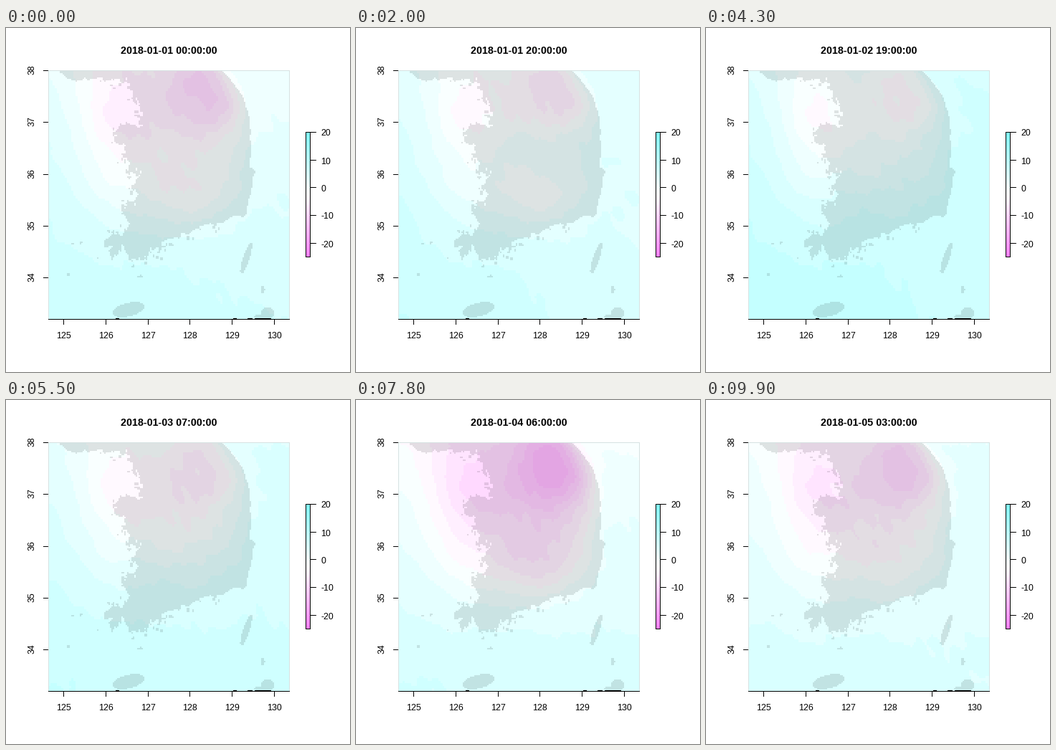
Recreate the animation shown at these times as a matplotlib script. Size 480 by 480 pixels, loop 10 s.

```python
import numpy as np
import matplotlib.pyplot as plt
from matplotlib.animation import FuncAnimation
from matplotlib.patches import Rectangle
from matplotlib.path import Path

FRAMES, INTERVAL = 100, 100
LEFT, RIGHT, TOP, BOTTOM = 59, 396, 59, 406
BANDS = 12          # colour steps on each side of white
rng = np.random.default_rng(18)

plt.rcParams["font.family"] = "Liberation Sans"
fig = plt.figure(figsize=(4.8, 4.8), dpi=100, facecolor="white")
ax = fig.add_axes([0, 0, 1, 1])
ax.axis("off")


def cell_centres(nx, ny):
    x = LEFT + (np.arange(nx) + 0.5) * (RIGHT - LEFT) / nx
    y = TOP + (np.arange(ny) + 0.5) * (BOTTOM - TOP) / ny
    return np.meshgrid(x, y)


def colours(level):
    """Magenta - white - cyan for levels in -1..1."""
    rgb = np.ones(level.shape + (3,))
    rgb[..., 0] -= 0.498 * np.clip(level, 0, 1)
    rgb[..., 1] -= 0.498 * np.clip(-level, 0, 1)
    return rgb


def show(img, box, z):
    x0, x1, y0, y1 = box
    return ax.imshow(img, extent=(x0, x1, y1, y0), interpolation="nearest",
                     aspect="auto", zorder=z)


# ---- temperature: a sea gradient between four corners, plus cold pools ----
gx, gy = cell_centres(115, 97)
u = (gx - LEFT) / (RIGHT - LEFT)
w = ((gy - TOP) / (BOTTOM - TOP)) ** 0.7


def pool(cx, cy, sx, sy):
    return np.exp(-((gx - cx) / sx) ** 2 - ((gy - cy) / sy) ** 2)


east_shore = 335 - 38 * np.exp(-(gy - TOP) / 35)
on_land = 1 / (1 + np.exp((gx - east_shore) / 9))
basis = np.array([
    (1 - u) * (1 - w), u * (1 - w), (1 - u) * w, u * w,
    pool(275, 85, 75, 65) * on_land,
    pool(255, 165, 85, 60) * on_land,
    pool(250, 235, 75, 45) * on_land,
    pool(150, 130, 55, 120),
])

# hour: corners NW, NE, SW, SE; pools north, centre, south, west
weather = {
    0: (1.8, 1.0, 4.9, 4.0, -4.8, -2.0, -2.5, -3.2),
    20: (2.4, 2.2, 5.0, 3.3, -4.0, -0.7, -2.6, -2.9),
    34: (1.8, 3.4, 6.0, 4.4, -6.1, -1.4, -4.7, -3.0),
    43: (2.8, 3.9, 5.9, 4.7, -3.6, -2.2, -0.6, -3.4),
    65: (1.5, 2.2, 4.3, 3.9, -2.6, -1.2, -0.2, -2.3),
    78: (0.0, 0.7, 4.1, 3.4, -7.1, -3.5, -3.1, -3.5),
    99: (0.8, 2.0, 3.6, 3.1, -4.8, -2.5, -1.7, -3.3),
}
hours = np.array(list(weather))
states = np.array(list(weather.values()))

inland = pool(250, 160, 75, 95)
relief = np.zeros_like(gx)
for _ in range(12):
    kx, ky = rng.normal(0, 0.09, 2)
    relief += 0.13 * np.sin(kx * gx + ky * gy + rng.uniform(0, 6.3))
relief *= 0.25 + inland


def daily(h):
    return np.cos(2 * np.pi * (h - 15) / 24)


def field_image(h):
    state = [np.interp(h, hours, s) for s in states.T]
    swing = daily(h) - np.interp(h, hours, daily(hours))
    t = np.tensordot(state, basis, 1) + 1.2 * swing * inland + relief
    return colours((np.floor(t) + 0.5) / BANDS)


# ---- land ----
def fractal(points, rough, depth=3):
    """Roughen a line by random midpoint displacement."""
    p = np.array(points, float)
    for _ in range(depth):
        d = np.diff(p, axis=0)
        normal = np.column_stack([-d[:, 1], d[:, 0]])
        mid = p[:-1] + d / 2 + normal * rng.normal(0, rough, (len(d), 1))
        p = np.insert(p, np.arange(1, len(p)), mid, axis=0)
    return p


west = [(127, 40), (130, 64), (152, 72), (168, 76), (176, 98), (187, 114),
        (185, 130), (193, 138), (168, 132), (150, 146), (163, 164),
        (160, 180), (170, 185), (170, 203), (187, 207), (174, 222),
        (185, 232), (163, 256), (163, 289), (147, 319)]
south = [(147, 319), (166, 309), (180, 323), (200, 312), (214, 309),
         (222, 296), (244, 292), (262, 281), (290, 276), (310, 266),
         (331, 264)]
east = [(331, 264), (341, 234), (344, 212), (349, 201), (340, 194),
        (342, 160), (340, 128), (334, 108), (325, 88), (313, 72), (300, 59),
        (300, 40)]
northwest = [(80, 50), (83, 67), (102, 73), (118, 72), (135, 66), (135, 50)]

mx, my = cell_centres(168, 173)
cells = np.column_stack([mx.ravel(), my.ravel()])
shore = np.vstack([fractal(west, 0.2), fractal(south, 0.2)])


def inside(poly):
    return Path(poly).contains_points(cells).reshape(mx.shape)


def ellipse(cx, cy, a, b, deg=0):
    c, s = np.cos(np.radians(deg)), np.sin(np.radians(deg))
    dx, dy = mx - cx, my - cy
    return ((dx * c + dy * s) / a) ** 2 + ((dy * c - dx * s) / b) ** 2 < 1


land = inside(np.vstack([shore, fractal(east, 0.05)]))
land |= inside(fractal(northwest, 0.2))


def scatter(count, spread, value):
    """Sprinkle islets (True) or inlets (False) along the shore."""
    for x, y in shore[rng.integers(8, len(shore) - 8, count)]:
        dx, dy = rng.normal(0, spread, 2)
        a, b = rng.uniform(0.9, 2.8, 2)
        land[ellipse(x + dx, y + dy, a, b)] = value


scatter(70, 3, False)
scatter(130, 5, True)
for shape in ((171, 393, 23, 9.5, -14), (335, 321, 23, 4.5, -72),
              (358, 365, 3, 5), (365, 398, 10, 8), (354, 403, 8, 4),
              (87, 344, 2, 2), (105, 299, 2, 2), (94, 301, 2, 1.5),
              (188, 346, 6, 1.2), (217, 322, 2, 2), (155, 405, 2.5, 2),
              (320, 405, 1.5, 2), (341, 405, 3, 2)):
    land |= ellipse(*shape)

shade = np.zeros(land.shape + (4,))
shade[..., 3] = 0.11 * land

box = (LEFT, RIGHT, TOP, BOTTOM)
raster = show(field_image(0), box, 1)
show(shade, box, 2)


# ---- frame, axes and legend ----
def line(x0, y0, x1, y1, color="black"):
    ax.plot([x0, x1], [y0, y1], color=color, lw=0.72, zorder=4, snap=False,
            solid_capstyle="butt", antialiased=False)


def label(x, y, s, px=12.4, **kw):
    return ax.text(x, y, s, fontsize=px * 0.72, zorder=5, **kw)


for x in (LEFT + 0.5, RIGHT - 0.5):
    line(x, TOP, x, BOTTOM, "#d6e2e2")
line(LEFT, TOP + 0.5, RIGHT, TOP + 0.5, "#d6e2e2")
line(LEFT, BOTTOM + 0.5, RIGHT, BOTTOM + 0.5)
for x in mx[-1][land[-1]]:
    line(x - 1, BOTTOM - 0.5, x + 1, BOTTOM - 0.5)

for i in range(6):
    x = round(80 + 58.75 * i)
    line(x + 0.5, BOTTOM, x + 0.5, BOTTOM + 8)
    label(x, 433, str(125 + i), ha="center", va="baseline")
for i in range(5):
    y = round(59 + 72.3 * i)
    line(52, y + 0.5, LEFT, y + 0.5)
    label(42.5, y - 0.5, str(38 - i), rotation=90, ha="right", va="center")

ramp = np.linspace(1, -1, 174)[:, None]
show(colours(ramp), (418, 425, 145, 319), 3)
ax.add_patch(Rectangle((418.5, 145.5), 6, 174, fill=False, lw=0.72,
                       ec="black", zorder=4, antialiased=False, snap=False))
for i, s in enumerate(("20", "10", "0", "-10", "-20")):
    y = int(145.5 + 38.7 * i)
    line(425, y + 0.5, 433, y + 0.5)
    label(439, y + 5.5, s, va="baseline")

title = label(160, 36, "", px=14.2, weight="bold", va="baseline")
ax.set(xlim=(0, 480), ylim=(480, 0))


def update(h):
    raster.set_data(field_image(h))
    title.set_text(f"2018-01-{1 + h // 24:02d} {h % 24:02d}:00:00")
    return raster, title


anim = FuncAnimation(fig, update, frames=FRAMES, interval=INTERVAL,
                     repeat=True, repeat_delay=0)
plt.show()
```
